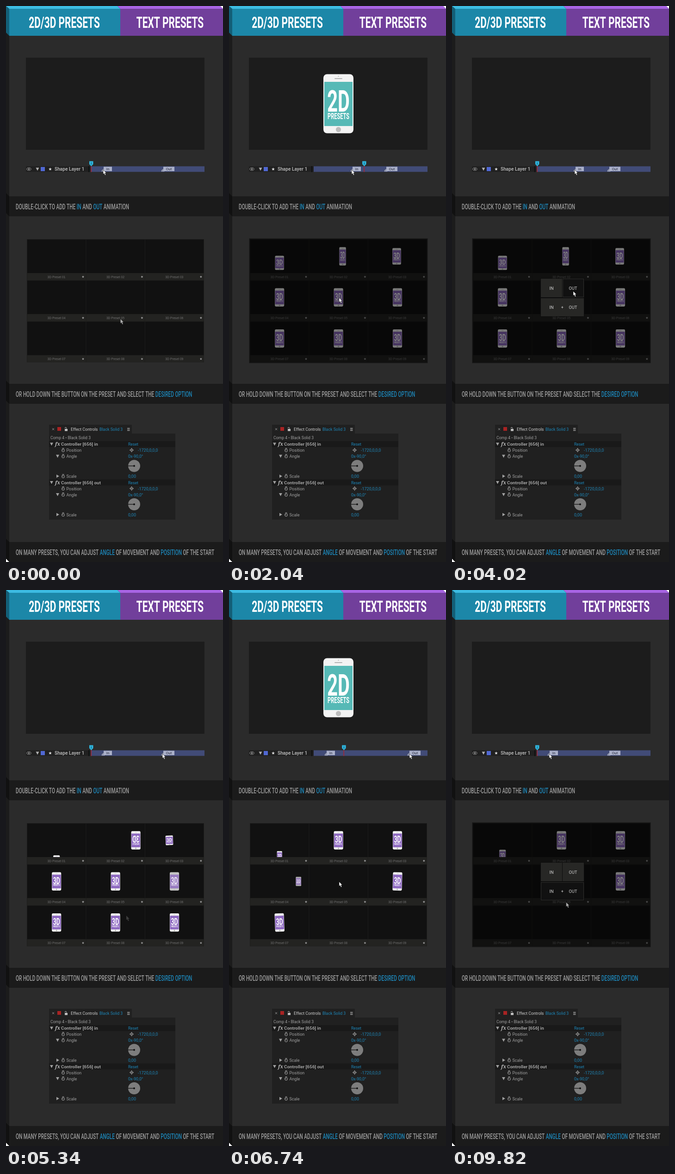
An HTML page with a canvas that plays this animation: 469 px wide and 1195 px high, repeating every 9840 ms.

```html
<!DOCTYPE html>
<html lang="en">
<head>
<meta charset="utf-8">
<title>Presets</title>
<style>
  html, body { margin: 0; width: 100%; height: 100%; overflow: hidden; background: #2b2b2b; }
  canvas { display: block; width: 469px; height: 1195px; }
</style>
</head>
<body>
<canvas id="stage" width="469" height="1195"></canvas>
<script>
const ctx = document.getElementById('stage').getContext('2d');
const LOOP = 9840;
const SANS = 'Roboto, "Open Sans", sans-serif';
const NARROW = 0.62; // one ratio for the whole condensed display face
const BLUE = '#1d86b8';

// ---------- helpers ----------
const clamp = (v, a = 0, b = 1) => Math.min(b, Math.max(a, v));
const mix = (a, b, p) => a + (b - a) * p;
const part = (t, a, b) => clamp((t - a) / (b - a));
const smooth = p => p * p * (3 - 2 * p);
const easeOut = p => 1 - (1 - p) * (1 - p);

function rect(x, y, w, h, fill) {
  ctx.fillStyle = fill;
  ctx.fillRect(x, y, w, h);
}

function poly(fill, ...pts) {
  ctx.beginPath();
  for (let i = 0; i < pts.length; i += 2) ctx.lineTo(pts[i], pts[i + 1]);
  ctx.closePath();
  ctx.fillStyle = fill;
  ctx.fill();
}

function circle(x, y, r, fill) {
  ctx.beginPath();
  ctx.arc(x, y, r, 0, Math.PI * 2);
  ctx.fillStyle = fill;
  ctx.fill();
}

function line(x1, y1, x2, y2, color, width = 1) {
  ctx.beginPath();
  ctx.moveTo(x1, y1);
  ctx.lineTo(x2, y2);
  ctx.strokeStyle = color;
  ctx.lineWidth = width;
  ctx.stroke();
}

function round(x, y, w, h, r, fill) {
  ctx.beginPath();
  ctx.roundRect(x, y, w, h, r);
  ctx.fillStyle = fill;
  ctx.fill();
}

function text(str, x, y, font, fill, align = 'left') {
  ctx.font = font;
  ctx.fillStyle = fill;
  ctx.textAlign = align;
  ctx.fillText(str, x, y);
}

function narrow(str, x, y, size, weight, fill, align) {
  ctx.save();
  ctx.translate(x, y);
  ctx.scale(NARROW, 1);
  text(str, 0, 0, `${weight} ${size}px ${SANS}`, fill, align);
  const width = ctx.measureText(str).width * NARROW;
  ctx.restore();
  return width;
}

function star(x, y, r, fill) {
  const pts = [];
  for (let i = 0; i < 10; i++) {
    const a = i * Math.PI / 5 - Math.PI / 2, d = i % 2 ? r * 0.42 : r;
    pts.push(x + Math.cos(a) * d, y + Math.sin(a) * d);
  }
  poly(fill, ...pts);
}

function cursor(x, y, alpha = 1) {
  if (alpha <= 0) return;
  ctx.save();
  ctx.globalAlpha = alpha;
  ctx.translate(x, y);
  poly('#fff', 0, 0, 0, 9.6, 2.2, 7.7, 4, 11.8, 5.8, 11, 4.1, 7, 6.9, 7);
  ctx.strokeStyle = '#111';
  ctx.lineWidth = 0.6;
  ctx.stroke();
  ctx.restore();
}

// Phone in a 65 x 127 box around the origin
function phone(label, color) {
  round(-32.5, -63.5, 65, 127, 8, '#f3f3f3');
  rect(-30.5, -47, 61, 95, color);
  round(-8.5, -55, 17, 2, 1, '#b4b4b4');
  circle(0, -59, 1, '#b4b4b4');
  circle(0, 55.5, 5.5, '#bcbcbc');
  narrow(label, 0, 16.8, 64, 700, '#fff', 'center');
  narrow('PRESETS', 0, 32.6, 17.8, 700, '#fff', 'center');
}

// ---------- page frame ----------
function caption(y, parts) {
  rect(7, y, 462, 43, '#1b1b1b');
  poly('#111', 0, y - 7, 7, y, 7, y + 43, 0, y + 36);
  let x = 21;
  parts.forEach((str, i) => {
    x += narrow(str, x, y + 28.2, 16.4, 500, i % 2 ? BLUE : '#9c9c9c');
  });
}

function page() {
  rect(0, 0, 469, 1195, '#2b2b2b');
  rect(0, 0, 7, 1195, '#1c1c1c');
  poly('#135f77', 0, 0, 7, 6, 7, 64, 0, 57);
  rect(7, 6, 240, 58, '#1c87a8');
  rect(247, 6, 222, 58, '#713f9b');
  poly('#3cbbe2', 0, 0, 241, 0, 247, 6, 7, 6);
  poly('#a864e4', 241, 0, 463, 0, 469, 6, 247, 6);
  poly('#fff', 463, 0, 469, 0, 469, 6);
  narrow('2D/3D PRESETS', 126, 46.9, 33.8, 700, '#fff', 'center');
  narrow('TEXT PRESETS', 354.5, 46.9, 33.8, 700, '#fff', 'center');
  caption(409, ['DOUBLE-CLICK TO ADD THE ', 'IN', ' AND ', 'OUT', ' ANIMATION']);
  caption(812, ['OR HOLD DOWN THE BUTTON ON THE PRESET AND SELECT THE ', 'DESIRED OPTION']);
  caption(1152, ['ON MANY PRESETS, YOU CAN ADJUST ', 'ANGLE', ' OF MOVEMENT AND ', 'POSITION', ' OF THE START']);
  poly('#fff', 0, 1188, 7, 1195, 0, 1195);
}

// ---------- layer with In and Out markers ----------
const BAR = { left: 184, right: 430, speed: 0.127 };

function marker(x, label, width) {
  poly('#8f95ad', x - 4, 356.5, x - 4, 353.5, x, 349.5, x + 4, 353.5, x + 4, 356.5);
  ctx.strokeStyle = '#2c3352';
  ctx.lineWidth = 0.8;
  ctx.stroke();
  rect(x + 1, 345.5, width, 9.5, '#aab0c9');
  text(label, x + 1 + width / 2, 353.3, `8px ${SANS}`, '#22263a', 'center');
}

function timeline(t) {
  const second = t >= 4840;
  const start = second ? 6236 : 1190;
  const reset = second ? 8280 : 3260;

  const inX = 210 + 56 * smooth(part(t, 350, 900)) - 56 * smooth(part(t, 4060, 4600));
  const outX = 339 + 50 * smooth(part(t, 5400, 5950)) - 50 * smooth(part(t, 8600, 9400));
  const handX = 210 + 55 * smooth(part(t, 350, 900)) + 73 * smooth(part(t, 4040, 4680))
    + 52 * smooth(part(t, 5400, 5950)) - 180 * smooth(part(t, 8600, 9640));
  const playing = t >= start && t < reset;
  const head = playing ? Math.min(BAR.right, BAR.left + (t - start) * BAR.speed) : BAR.left;

  rect(43, 111, 386, 198, '#1c1c1c');
  if (playing) {
    const rise = 1 - Math.pow(1 - part(head, BAR.left, inX), 3.25);
    const fall = 1 - Math.pow(part(head, outX, BAR.right), 3.25);
    const scale = rise * fall;
    if (scale > 0.005) {
      ctx.save();
      ctx.translate(236.5, 210);
      ctx.scale(scale, scale);
      phone('2D', '#56b9b6');
      ctx.restore();
    }
  }

  rect(43, 344.5, 140, 12, '#202020');
  ctx.beginPath();
  ctx.ellipse(49.5, 350.5, 4.5, 2.8, 0, 0, Math.PI * 2);
  ctx.strokeStyle = '#a8a8a8';
  ctx.lineWidth = 1;
  ctx.stroke();
  circle(49.5, 350.5, 1.5, '#a8a8a8');
  poly('#b0b0b0', 64.5, 347.5, 71.5, 347.5, 68, 354);
  rect(75, 346, 9, 9, '#5068d2');
  star(95.5, 350.7, 3.6, '#e0e0e0');
  text('Shape Layer 1', 105, 354, `bold 10.1px ${SANS}`, '#acacac');
  rect(178, 344, 2, 13, '#101010');
  rect(183, 344.5, 246, 12, '#414b77');

  marker(inX, 'In', 18);
  marker(outX, 'Out', 24);

  line(head, 344, head, 357, '#b3212b', 1.4);
  poly('#2fb4dc', head - 4, 333.5, head + 4.5, 333.5, head + 4.5, 340, head + 0.3, 344.5, head - 4, 340);
  line(head + 0.3, 336, head + 0.3, 341, '#156b88', 1.4);
  cursor(handX, 352);
}

// ---------- preset grid ----------
const REST = { x: 0, y: 0, w: 1, h: 1, r: 0, a: 1 };
const GONE = { w: 0, h: 0, a: 0 };
const LEFT = { x: 75, w: -1 };
const SUNK = { y: 60, w: 0.6, h: 0.6 };
const SLID = { x: 64, w: 0.4, h: 0.4, a: 0 };

// Key poses over clip time, in ms
const CLIPS = [
  [[100, SUNK], [600, {}], [1800, {}], [2040, { y: 14, w: 0.96, h: 0.78 }],
    [2540, { y: 46, w: 0.7, h: 0.7 }], [2640, SUNK], [3700, { y: 52, w: 0.4, h: 0.4 }],
    [3940, { y: 34, w: 0.55, h: 0.55 }], [4000, { y: 34, w: 0.7, h: 0.7 }]],
  [[150, LEFT], [700, {}], [1850, {}], [2040, { x: 9, w: 0.72 }],
    [2540, { x: 44, w: -1 }], [2800, LEFT], [3000, LEFT], [3500, {}]],
  [[200, GONE], [750, {}], [1850, {}], [2040, { x: -1.5, w: 0.93, h: 0.9 }],
    [2540, { x: -11, w: 0.8, h: 0.52, r: -0.04 }], [2750, { x: -16, ...GONE }], [3000, GONE], [3500, {}]],
  [[100, SLID], [550, {}], [3800, {}], [3940, { x: 41, w: 0.58, h: 0.5, a: 0.7 }], [3990, SLID]],
  [[200, { w: 0 }], [700, {}], [3500, {}], [3850, { w: 0 }]],
  [[250, { a: 0 }], [750, {}], [2440, {}], [2540, { a: 0.8 }], [2700, { a: 0 }],
    [3000, { a: 0 }], [3500, {}], [3850, {}], [3940, { r: 0.03 }], [4000, {}]],
  [[300, GONE], [800, {}], [3850, {}], [3940, { r: -0.04 }], [4000, GONE]],
  [[350, { h: 0 }], [850, {}], [3300, {}], [3750, { h: 0 }]],
  [[400, GONE], [900, {}], [3200, {}], [3700, GONE]]
];

function poseAt(keys, c) {
  let i = keys.findIndex(k => k[0] > c);
  if (i < 0) i = keys.length;
  const a = keys[Math.max(0, i - 1)], b = keys[Math.min(keys.length - 1, i)];
  const from = { ...REST, ...a[1] }, to = { ...REST, ...b[1] };
  const p = a === b ? 0 : smooth(part(c, a[0], b[0]));
  const pose = {};
  for (const k in REST) pose[k] = mix(from[k], to[k], p);
  return pose;
}

function cell(i, c) {
  const x = 46 + (i % 3) * 127.4, y = 502 + Math.floor(i / 3) * 88.3;
  rect(x, y, 126.4, 72, '#111111');
  rect(x, y + 72, 126.4, 15.3, '#232321');
  text('3D Preset 0' + (i + 1), x + 63, y + 82.5, '6.7px "Liberation Sans", Arial, sans-serif', '#717171', 'center');
  star(x + 120.5, y + 80, 2.8, '#a0a0a0');

  const pose = poseAt(CLIPS[i], c);
  if (pose.a <= 0 || Math.abs(pose.w) < 0.01 || pose.h < 0.01) return;
  ctx.save();
  ctx.beginPath();
  ctx.rect(x, y, 126.4, 72);
  ctx.clip();
  ctx.globalAlpha = pose.a;
  ctx.translate(x + 63.2 + pose.x, y + 36 + pose.y);
  ctx.rotate(pose.r);
  ctx.scale(0.31 * pose.w, 0.31 * pose.h);
  phone('3D', '#8e69c1');
  ctx.restore();
}

// Pointer stops as [start, end, x, y]
const STOPS = [
  [2250, 2650, 215, 613], [3000, 3550, 262, 613], [4060, 4660, 252, 648],
  [6880, 7300, 215, 613], [7650, 8280, 262, 613], [8620, 9300, 236, 648]
];
const HOME = [238, 627], AWAY = [260, 700];

function pointer(t) {
  const leaving = t >= 9540 || t < 700;
  if (leaving || (t >= 4840 && t < 5560)) {
    const p = leaving ? part(t < 700 ? t + LOOP : t, 9540, 10640) : part(t, 4840, 5380);
    const e = easeOut(p), late = leaving ? t : t - 4840;
    const gone = leaving && t >= 9540 ? 0 : part(late, 520, 700);
    return {
      x: mix(leaving ? 236 : 252, AWAY[0], e),
      y: mix(648, AWAY[1], e),
      a: (1 - 0.85 * Math.pow(p, 0.7)) * (1 - gone)
    };
  }
  const begin = t < 4840 ? 1200 : 6000;
  if (t < begin + 660) {
    const p = smooth(part(t, begin, begin + 660));
    return { x: mix(AWAY[0], HOME[0], p), y: mix(AWAY[1], HOME[1], p), a: p };
  }
  let [x, y] = HOME;
  for (const [a, b, px, py] of STOPS) {
    if (a < begin || t < a) continue;
    const p = smooth(part(t, a, b));
    x = mix(x, px, p);
    y = mix(y, py, p);
  }
  return { x, y, a: 1 };
}

function option(x, y, w, h, over) {
  rect(x, y, w, h, over ? '#111111' : '#272725');
  if (over) {
    ctx.strokeStyle = '#2e2e2c';
    ctx.lineWidth = 1;
    ctx.strokeRect(x + 0.5, y + 0.5, w - 1, h - 1);
  }
}

function menu(hand) {
  const font = `9.2px ${SANS}`, ink = '#d6d6d6';
  const upper = hand.y < 626;
  rect(191, 585, 95, 83, '#0c0c0c');
  option(192, 586, 46, 40, upper && hand.x < 238);
  option(239, 586, 46, 40, upper && hand.x >= 238);
  // the lower option stays chosen while the pointer leaves downwards
  option(192, 628, 93, 39, hand.y >= 628);
  for (const y of [609.5, 651]) {
    text('IN', 215, y, font, ink, 'center');
    text('OUT', 261.5, y, font, ink, 'center');
  }
  text('+', 238.3, 650.5, font, ink, 'center');
}

function grid(t) {
  const clip = t < 4840 ? Math.min(t, 2040) : Math.min(t - 2800, 4000);
  const dim = t < 4840 ? t >= 2020 : t >= 6800;
  const open = t < 4840 ? t >= 2080 : t >= 6820;
  const hand = pointer(t);
  rect(45, 501, 383, 265, '#1e1e1d');
  for (let i = 0; i < 9; i++) cell(i, clip);
  if (dim) rect(43.5, 499.5, 386, 268, 'rgba(0,0,0,0.5)');
  if (open) menu(hand);
  cursor(hand.x, hand.y, hand.a);
}

// ---------- effect controls ----------
const GREY = '#a0a0a0';

function fold(x, y, open) {
  if (open) poly(GREY, x - 3.5, y - 3, x + 3.5, y - 3, x, y + 3.5);
  else poly(GREY, x - 2.5, y - 3.5, x + 3.5, y, x - 2.5, y + 3.5);
}

function ring(x, y, r) {
  ctx.beginPath();
  ctx.arc(x, y, r, 0, Math.PI * 2);
  ctx.strokeStyle = '#b4b4b4';
  ctx.lineWidth = 1;
  ctx.stroke();
}

function property(name, y, value, valueX) {
  const font = `9px ${SANS}`;
  ring(123.5, y + 0.8, 3);
  line(123.5, y + 1, 122, y - 0.8, '#b4b4b4');
  line(121.5, y - 3.8, 125.5, y - 3.8, '#b4b4b4');
  text(name, 130.5, y + 3.6, font, GREY);
  text(value, valueX, y + 3.6, font, BLUE);
}

function effect(y, name) {
  rect(93, y - 6.5, 273, 13, '#191919');
  fold(98.5, y, true);
  text('fx', 106, y + 3.8, 'italic bold 11px "Noto Serif", serif', '#bdbdbd');
  text(name, 119, y + 3.8, `bold 9.9px ${SANS}`, GREY);
  text('Reset', 264, y + 3.6, `8.7px ${SANS}`, BLUE);
  property('Position', y + 13, '-1720,0,0,0', 285);
  ring(271.5, y + 13, 2.6);
  circle(271.5, y + 13, 1, '#b4b4b4');
  line(267, y + 13, 269, y + 13, '#b4b4b4');
  line(274, y + 13, 276, y + 13, '#b4b4b4');
  line(271.5, y + 8.5, 271.5, y + 10.5, '#b4b4b4');
  line(271.5, y + 15.5, 271.5, y + 17.5, '#b4b4b4');
  fold(111.5, y + 26, true);
  property('Angle', y + 26, '0x-90,0°', 264);
  circle(277, y + 47, 13, '#7d7d7d');
  line(264, y + 47, 277, y + 47, '#111', 1.3);
  circle(277, y + 47, 1.9, '#111');
  fold(111.5, y + 69, false);
  property('Scale', y + 69, '0,00', 264);
}

function controls() {
  rect(93, 900, 179, 20, '#202020');
  rect(93, 919, 273, 185, '#202020');
  line(100, 907.5, 104, 911.5, GREY);
  line(104, 907.5, 100, 911.5, GREY);
  rect(111, 905, 8, 8, '#a82323');
  rect(127, 909, 6, 4.5, '#c4c4c4');
  ctx.beginPath();
  ctx.arc(129, 907.5, 1.8, Math.PI, Math.PI * 2.2);
  ctx.strokeStyle = '#c4c4c4';
  ctx.lineWidth = 1;
  ctx.stroke();
  text('Effect Controls', 140, 913, `8.8px ${SANS}`, '#cfcfcf');
  text('Black Solid 3', 202, 913, `8.8px ${SANS}`, BLUE);
  for (let y = 907.5; y < 913; y += 2.5) line(262, y, 267.5, y, '#c4c4c4');
  text('Comp 4 • Black Solid 3', 96, 931, `8.7px ${SANS}`, GREY);
  effect(941.5, 'Controller [656] in');
  effect(1024, 'Controller [656] out');
}

// ---------- run ----------
const begun = performance.now();

function frame() {
  const t = (performance.now() - begun) % LOOP;
  page();
  timeline(t);
  grid(t);
  controls();
  requestAnimationFrame(frame);
}
frame();
</script>
</body>
</html>
```
